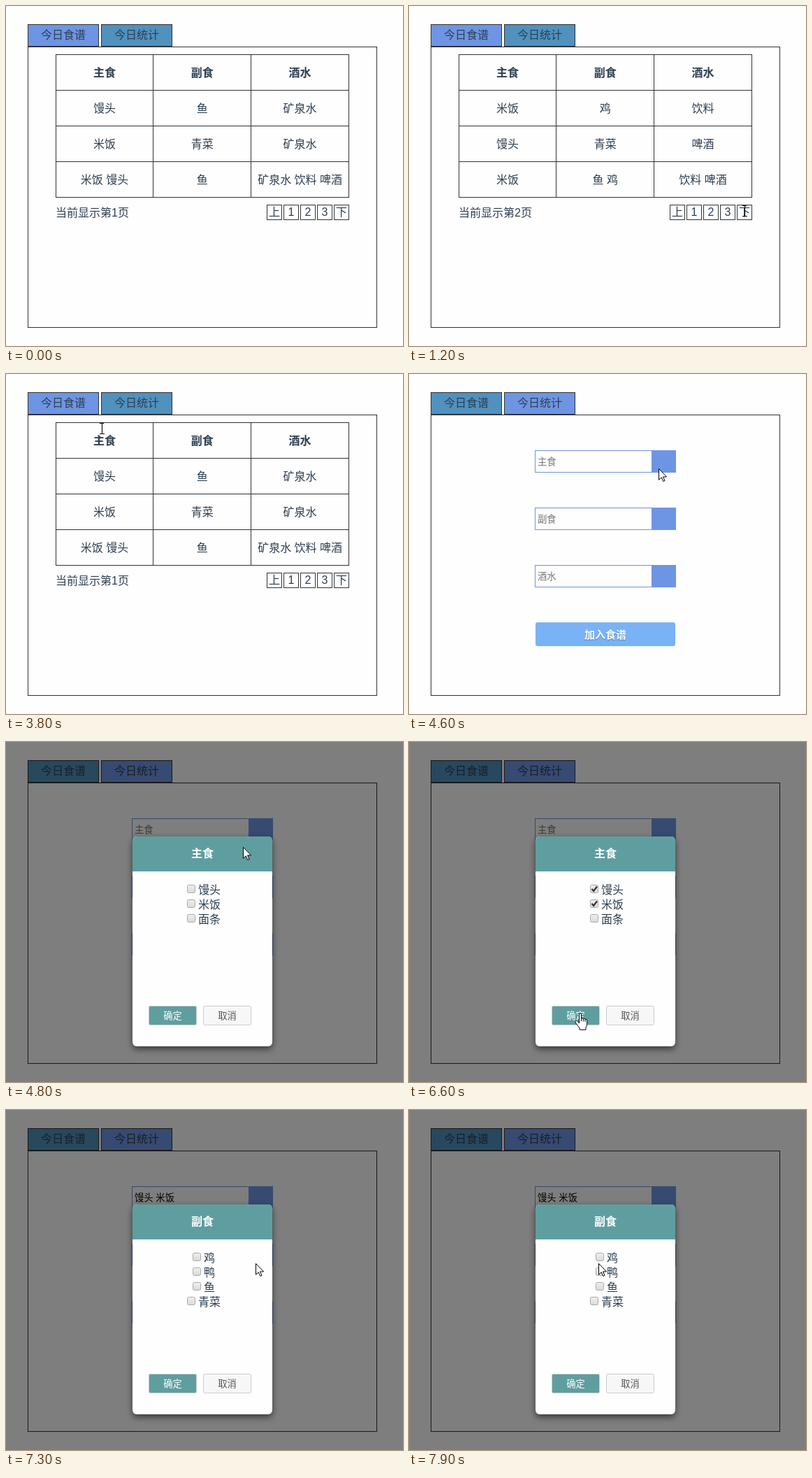
An HTML page that plays this animation: 568 px wide and 486 px high, repeating every 8 s.

```html
<!DOCTYPE html>
<html lang="zh-CN">
<head>
<meta charset="utf-8">
<title>今日食谱</title>
<style>
html, body { margin: 0; width: 100%; height: 100%; overflow: hidden; background: #fefefe; }
svg { display: block; width: 568px; height: 486px; }
text { font-family: "Liberation Sans", "Noto Sans CJK SC", "Noto Sans CJK", sans-serif; font-size: 16px; font-weight: 350; fill: #2c3e50; white-space: pre; }
.mid { text-anchor: middle; }
.bold { font-weight: bold; }
.small { font-size: 13.33px; }
.add { font-size: 15px; fill: #fff; text-shadow: 0 1px 1px #4678b0; }
.line { fill: none; stroke: #333; }
#box { filter: drop-shadow(0 4px 5px rgba(0, 0, 0, .55)); }
</style>
</head>
<body>
<svg viewBox="0 0 568 486">
  <defs>
    <linearGradient id="grey" x2="0" y2="1">
      <stop stop-color="#efefef"/><stop offset="1" stop-color="#dadada"/>
    </linearGradient>
  </defs>
  <rect width="568" height="486" fill="#fefefe"/>
  <g id="tabs"></g>
  <rect class="line" x="31.5" y="58.5" width="499" height="401"/>
  <g id="menu"></g>
  <g id="form"></g>
  <g id="modal">
    <rect width="568" height="486" fill="#000" opacity=".5"/>
    <g id="box">
      <rect x="181" y="135" width="200" height="300" rx="6" fill="#fefefe"/>
      <path d="M181 185V141a6 6 0 0 1 6-6H375a6 6 0 0 1 6 6V185Z" fill="#5f9ea0"/>
    </g>
    <g id="content"></g>
  </g>
  <g id="cursor">
    <path id="arrow" d="M.5 .5V16.3L4.2 12.9 6.8 18.5 9 17.5 6.5 12H11.6Z" fill="#fff" stroke="#000"/>
    <path id="beam" d="M-3-7.5H3M.5-7V7M-3 7.5H4" fill="none" stroke="#111" stroke-width="1.2"/>
    <path id="hand" d="M.6 2.2Q.6.6 2 .6T3.5 2.2V8.2Q5 7 6.3 8.6 7.8 7.6 9 9.2 11.7 8.7 11.7 11.5V16.5Q11.7 19 10 21V24.3H1.2V22Q-1.6 18.5-4.8 14-6 12-4.4 11.4-3 11-1.2 13L.6 15ZM3.5 8.2V12M6.3 8.6V12.4M9 9.2V12.8" fill="#fff" stroke="#000" stroke-linejoin="round"/>
  </g>
</svg>
<script>
const LOOP = 8000, STEP = 100;
const $ = id => document.getElementById(id);

const HEAD = ['主食', '副食', '酒水'];
const PAGES = [
  ['馒头,鱼,矿泉水', '米饭,青菜,矿泉水', '米饭 馒头,鱼,矿泉水 饮料 啤酒'],
  ['米饭,鸡,饮料', '馒头,青菜,啤酒', '米饭,鱼 鸡,饮料 啤酒'],
  ['馒头 米饭,鸭 鱼,啤酒 饮料', '馒头 米饭,鱼 鸡,饮料 啤酒', '馒头 米饭,鱼 鸭,啤酒']
];
const OPTIONS = [['馒头', '米饭', '面条'], ['鸡', '鸭', '鱼', '青菜']];

// Pointer moves; it rests between them. A power above 1 slows the end.
const START = { x: 509, y: 220 };
const MOVES = [
  { from: 200, to: 500, x: 480, y: 300, power: 2 },
  { from: 1000, to: 1200, x: 480, y: 293 },
  { from: 2700, to: 2800, x: 422, y: 301 },
  { from: 2800, to: 3100, x: 409, y: 298 },
  { from: 3300, to: 3900, x: 83, y: 34 },
  { from: 4000, to: 4200, x: 186, y: 42 },
  { from: 4300, to: 4600, x: 357, y: 135 },
  { from: 4700, to: 5200, x: 265, y: 209 },
  { from: 5500, to: 5800, x: 267, y: 228 },
  { from: 6000, to: 6600, x: 243, y: 387 },
  { from: 6700, to: 7100, x: 357, y: 219, power: 3 },
  { from: 7300, to: 7900, x: 271, y: 219 }
];

const text = (s, x, y, cls = '', fill = '') =>
  `<text x="${x}" y="${y}" class="${cls}"${fill && ` style="fill:${fill}"`}>${s}</text>`;
const rect = (x, y, w, h, attrs) =>
  `<rect x="${x}" y="${y}" width="${w}" height="${h}" ${attrs}/>`;

function drawTabs(active) {
  return ['今日食谱', '今日统计'].map((s, i) =>
    rect(31.5 + 105 * i, 26.5, 101, 31, `stroke="#333" fill="${i === active ? '#6e95e3' : '#5091be'}"`) +
    text(s, 82 + 105 * i, 47, 'mid')).join('');
}

function drawMenu(page) {
  let lines = '', s = '';
  for (let i = 0; i < 4; i++) lines += `M${Math.floor(71 + 139.7 * i) + .5} 69V274`;
  for (let i = 0; i < 5; i++) lines += `M71 ${69.5 + 51 * i}H491`;
  s += `<path class="line" d="${lines}"/>`;
  [HEAD, ...PAGES[page].map(row => row.split(','))].forEach((row, r) => row.forEach((cell, c) => {
    s += text(cell, 141 + 139.8 * c, 101 + 51 * r, r ? 'mid' : 'mid bold');
  }));
  s += text(`当前显示第${page + 1}页`, 71, 301);
  [...'上123下'].forEach((ch, i) => {
    s += rect(373.5 + 24 * i, 284.5, 21, 21, 'class="line"') + text(ch, 384 + 24 * i, 300, 'mid');
  });
  return s;
}

function drawForm(staple) {
  return HEAD.map((label, i) => {
    const y = 109 + 82 * i, filled = !i && staple;
    return rect(180.5, y + .5, 201, 31, 'fill="#fefefe" stroke="#6e95d9"') +
      rect(347, y, 35, 32, 'fill="#6e95e3"') +
      text(filled || label, 184, y + 21, 'small', filled ? '#000' : '#757575');
  }).join('') +
    rect(181, 355, 200, 34, 'rx="3" fill="#79b3f5"') +
    text('加入食谱', 281, 378, 'mid bold add');
}

function drawContent(kind, checked) {
  let s = text(HEAD[kind], 281, 165, 'mid bold', '#fff');
  OPTIONS[kind].forEach((label, i) => {
    const x = 275 - 8 * label.length, y = 204 + 21 * i;
    s += rect(x + .5, y + .5, 11, 11, 'rx="2" fill="url(#grey)" stroke="#a9a9a9"') +
      text(label, x + 16, y + 13);
    if (i < checked)
      s += `<path d="M${x + 2.5} ${y + 6}l2.7 3 4.8-6.5" fill="none" stroke="#333" stroke-width="2.2"/>`;
  });
  [['确定', '#5f9ea0', '#fff'], ['取消', '#f7f7f7', '#555']].forEach(([label, bg, fg], i) => {
    const x = 204 + 78 * i;
    s += rect(x + .5, 377.5, 68, 27, `rx="2" fill="${bg}" stroke="#ccc"`) +
      text(label, x + 34.5, 396, 'small mid', fg);
  });
  return s;
}

const cache = {};
function fill(id, html) {
  if (cache[id] !== html) $(id).innerHTML = cache[id] = html;
}
const show = (id, on) => $(id).setAttribute('display', on ? 'inline' : 'none');
const within = (t, a, b) => t >= a && t < b;

function pointAt(t) {
  let { x, y } = START;
  for (const m of MOVES) {
    const k = Math.min(1, Math.max(0, (t - m.from) / (m.to - m.from)));
    const eased = 1 - (1 - k) ** (m.power || 1);
    x += (m.x - x) * eased;
    y += (m.y - y) * eased;
  }
  return [Math.round(x), Math.round(y)];
}

function render(ms) {
  const t = Math.floor(ms % LOOP / STEP) * STEP;
  const onForm = t >= 4300;
  const page = within(t, 1000, 1600) ? 1 : within(t, 1600, 3300) ? 2 : 0;
  const second = t >= 7300;
  const checked = second || t < 5500 ? 0 : t < 6000 ? 1 : 2;

  fill('tabs', drawTabs(onForm ? 1 : 0));
  fill('menu', drawMenu(page));
  fill('form', drawForm(t >= 6700 ? '馒头 米饭' : ''));
  fill('content', drawContent(second ? 1 : 0, checked));
  show('menu', !onForm);
  show('form', onForm);
  show('modal', within(t, 4800, 6700) || second);

  const beam = within(t, 500, 4400), hand = within(t, 6500, 6800);
  show('cursor', t >= 200);
  show('beam', beam);
  show('hand', hand);
  show('arrow', !beam && !hand);
  $('cursor').setAttribute('transform', `translate(${pointAt(t)})`);
}

const start = performance.now();
function tick() {
  render(performance.now() - start);
  requestAnimationFrame(tick);
}
tick();
</script>
</body>
</html>
```
